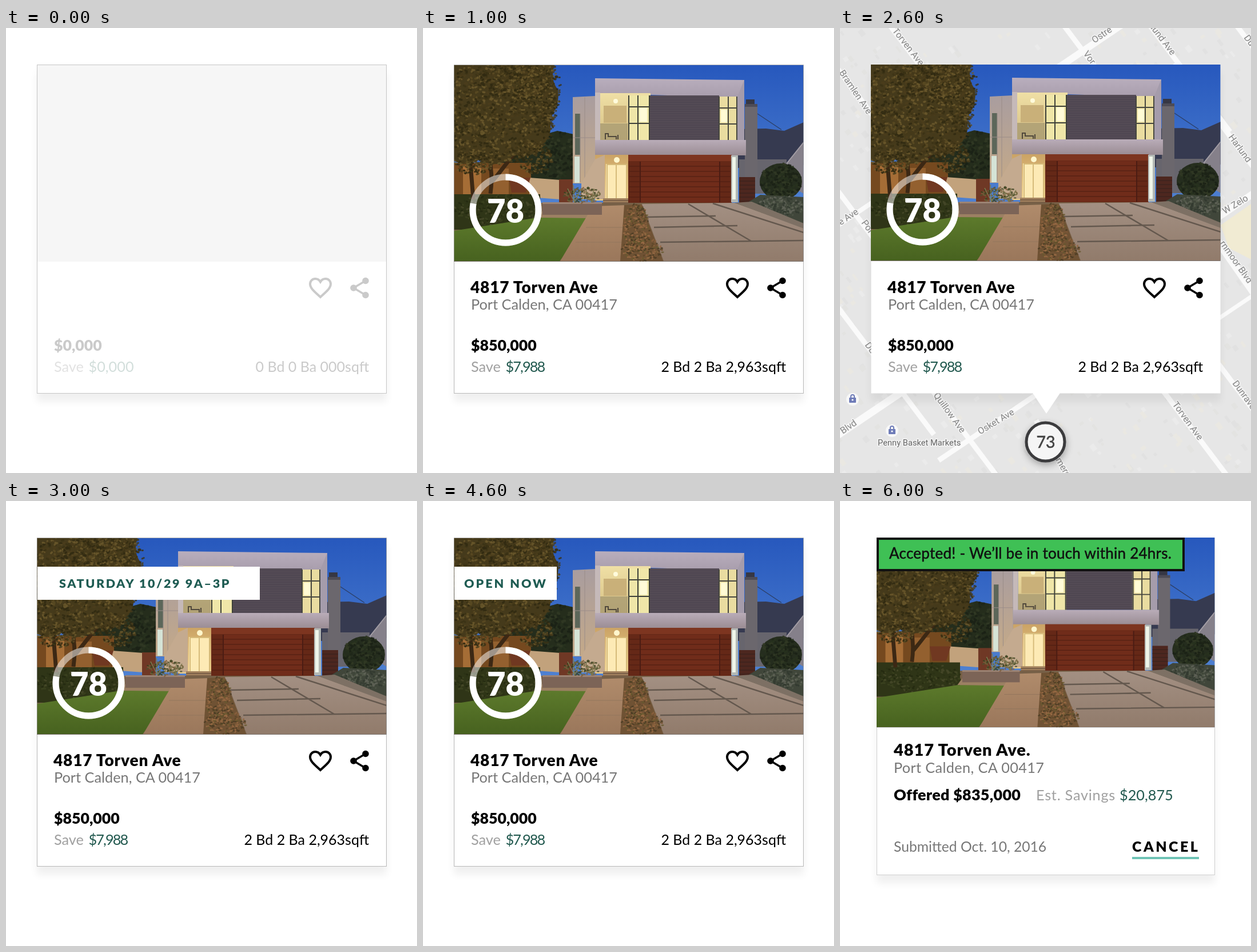
An HTML page for the animation above (7 s loop, 719 by 779 pixels).

```html
<!DOCTYPE html>
<html lang="en">
<head>
<meta charset="utf-8">
<title>Home listing card</title>
<style>
html, body { margin: 0; width: 100%; height: 100%; overflow: hidden; background: #fff; }
svg { display: block; }
text { font-family: Lato, "Open Sans", sans-serif; font-size: 25.3px; }
.b { font-weight: 900; }
.map text { font-family: Roboto, Arial, sans-serif; font-size: 16px; fill: #858585; stroke: #f4f4f4; stroke-width: 3; paint-order: stroke; }
</style>
</head>
<body>
<svg id="stage" width="719" height="779" viewBox="0 0 719 779"></svg>
<script>
let seed = 7;
const rnd = () => (seed = (seed * 16807) % 2147483647) / 2147483647;
const pick = list => list[Math.floor(rnd() * list.length)];

const rect = (x, y, w, h, fill, more = '') => `<rect x="${x}" y="${y}" width="${w}" height="${h}" fill="${fill}" ${more}/>`;
const poly = (pts, fill, more = '') => `<polygon points="${pts}" fill="${fill}" ${more}/>`;
const path = (d, stroke, width, more = '') => `<path d="${d}" fill="none" stroke="${stroke}" stroke-width="${width}" ${more}/>`;
const text = (x, y, str, fill = '#000', more = '') => `<text x="${x}" y="${y}" fill="${fill}" ${more}>${str}</text>`;
const bold = (x, y, str, size, fill = '#000', more = '') => text(x, y, str, fill, `class="b" style="font-size:${size}px" ${more}`);
const grad = (id, a, b) => `<linearGradient id="${id}" x2="0" y2="1"><stop stop-color="${a}"/><stop offset="1" stop-color="${b}"/></linearGradient>`;

// Scattered short dabs inside an ellipse, n per colour
function leaves(n, cx, cy, rx, ry, size, cols) {
  return cols.map(col => {
    let d = '';
    for (let i = 0; i < n; i++) {
      const a = rnd() * Math.PI * 2, r = Math.sqrt(rnd()), s = size * (rnd() - 0.5);
      d += `M${(cx + rx * r * Math.cos(a)).toFixed(1)} ${(cy + ry * r * Math.sin(a)).toFixed(1)}l${(size * rnd()).toFixed(1)} ${s.toFixed(1)}`;
    }
    return path(d, col, size, 'stroke-linecap="round" opacity=".8"');
  }).join('');
}

function slats(x, y, w, h, step, color) {
  let d = '';
  for (let v = y + step; v < y + h; v += step) d += `M${x} ${v}h${w}`;
  return path(d, color, 1);
}

function house() {
  return [
    // upper floor
    poly('262,121 301,119 301,272 262,272', 'url(#wing)'),
    rect(266, 150, 9, 72, '#5c6659'), rect(265, 225, 9, 46, '#d5e3d6'),
    path('M275 150V270M283 121V270M262 192h39', '#9a8c88', 1),
    poly('301,88 562,91 562,122 550,122 309,114 301,114', 'url(#roof)'),
    rect(301, 113, 9, 110, '#c5b9b9'),
    rect(310, 114, 88, 82, 'url(#room)'),
    rect(316, 136, 40, 30, '#c9b079'),
    `<circle cx="337" cy="128" r="4" fill="#fffbdc"/>`,
    rect(310, 167, 48, 29, '#a99b72', 'opacity=".8"'),
    path('M319 195v-10h5v5h14v5M341 195v-8', '#50483c', 2),
    rect(359, 118, 38, 78, '#efe6a8'),
    path('M360 118V196M376 118V196M396 118V196M360 138h36M360 167h36', '#3d4039', 2),
    rect(379, 140, 13, 24, '#fffbd7'),
    rect(397, 118, 121, 78, '#544b55'), slats(397, 118, 121, 78, 4, '#4b434e'),
    rect(517, 120, 34, 76, '#e9dca0'),
    path('M518 120V196M534 120V196M549 120V196M518 140h32M518 168h32', '#45463f', 2),
    rect(521, 143, 11, 22, '#fffbd4'),
    poly('550,120 562,91 562,197 550,197', '#a59cab'),
    rect(301, 196, 264, 27, 'url(#band)'),
    // ground floor
    rect(301, 222, 59, 80, 'url(#porch)'),
    poly('277,272 301,230 318,222 318,300 277,300', '#c4aa8f'),
    rect(320, 238, 37, 60, '#fdeab5'), path('M322 299V239H356V299M338 240V298', '#d6bb7a', 2),
    `<circle cx="339" cy="231" r="5" fill="#fff6cc"/>`,
    rect(315, 298, 44, 12, '#a3835f'), path('M315 302h44M315 306h44', '#705641', 1.5),
    rect(359, 222, 181, 84, '#652817'),
    rect(359, 222, 181, 11, '#7d3520'), rect(380, 234, 139, 71, '#702c1a'),
    slats(361, 233, 177, 72, 9, '#4b1c11'), path('M380 234V305M519 234V305', '#4b1c13', 2),
    rect(539, 223, 12, 82, '#b4b9b5'), rect(541, 226, 6, 74, '#eff5e9')
  ].join('');
}

function photo() {
  const bark = ['#4b3d1c', '#5c4b24', '#3a3115', '#6d5a2e', '#45391a', '#2f2911'];
  const dark = ['#1f2618', '#29321f', '#323a25', '#1a2014'];
  const scrub = ['#7d5836', '#8c623e', '#5d4628', '#67592f', '#9a6c45', '#4a3b23'];
  const gray = ['#545c4b', '#3f463a', '#63665a', '#30372e'];
  return [
    rect(54, 65, 612, 344, 'url(#sky)'),
    // neighbour on the right
    poly('550,177 600,176 632,180 666,165 666,240 550,245', '#363a50'),
    path('M585 150L627 178', '#2c4069', 1.5),
    poly('666,201 635,239 640,275 666,290', '#85808a'), path('M666 200L634 240', '#a59fa6', 2),
    rect(553, 230, 83, 60, '#67656d'),
    rect(563, 134, 22, 132, '#6b676d'), rect(565, 125, 15, 10, '#363744'), rect(563, 133, 22, 5, '#4e4c56'),
    // garden on the left
    poly('200,190 235,180 264,186 264,268 130,268 130,215', '#252d1c'),
    leaves(40, 232, 222, 32, 42, 4, dark),
    rect(54, 236, 135, 80, '#75491f'), rect(70, 240, 32, 60, '#a56d36'), rect(120, 246, 30, 50, '#93602f'),
    house(),
    poly('186,262 240,266 240,300 186,296', '#c2a27c'), rect(238, 265, 24, 42, '#6f3825'),
    poly('150,262 188,262 180,288 155,288', '#703821'),
    rect(54, 306, 612, 103, '#776047'),
    rect(54, 291, 151, 62, '#2f3517'),
    leaves(60, 130, 318, 76, 27, 3, ['#2b3114', '#3d4320', '#242910', '#48492a']),
    poly('200,332 209,320 312,326 298,334', '#9c8063'),
    poly('54,355 200,332 298,333 239,408 54,408', 'url(#lawn)'),
    // paving
    poly('297,312 357,310 346,408 240,408', 'url(#walk)'),
    path('M285 349h66M267 375h82', '#92765d', 1),
    poly('383,308 545,306 666,350 666,408 421,408', 'url(#drive)'),
    path('M392 331L512 329M404 349L550 346M415 375L666 372M464 308L574 373M507 307L666 358', '#64584e', 2.5),
    poly('352,310 382,309 420,408 345,408', '#6f5234'),
    leaves(55, 373, 350, 23, 42, 2.6, scrub), leaves(35, 383, 388, 36, 20, 2.6, scrub),
    rect(209, 307, 104, 20, '#7c6457'), rect(209, 305, 104, 3, '#9c8373'),
    leaves(30, 278, 293, 33, 14, 2.6, ['#4d5230', '#6b643a', '#80603f', '#39401f']),
    path('M265 305l-12-24M265 305l-2-30M265 305l12-25M295 305l-10-20M295 305l4-24M295 305l13-20', '#7c7a50', 1.5),
    // right planting
    rect(553, 261, 28, 45, '#4d271f'), slats(553, 261, 28, 45, 7, '#35211d'),
    `<ellipse cx="626" cy="269" rx="37" ry="32" fill="#252d1e"/>`,
    leaves(60, 625, 268, 35, 32, 3.5, dark),
    poly('570,304 590,292 666,296 666,342 640,336', '#40463a'),
    leaves(50, 625, 312, 40, 18, 3, gray),
    poly('545,306 575,304 666,342 666,351', '#7d7064'),
    // big tree
    path('M118 290Q125 240 105 190M120 270Q145 240 170 205M88 300L82 225', '#3c2814', 7),
    `<path d="M54 65H230Q222 90 236 108Q240 135 222 158Q228 190 208 205Q190 232 160 222Q130 250 98 230Q75 245 54 232Z" fill="#453a1b"/>`,
    leaves(240, 130, 145, 103, 94, 3.4, bark), leaves(80, 165, 88, 66, 36, 3.4, bark),
    leaves(35, 203, 105, 38, 60, 3, bark), leaves(30, 195, 228, 30, 28, 3, bark), leaves(35, 88, 235, 36, 22, 3, bark)
  ].join('');
}

const ring = () => {
  const c = 2 * Math.PI * 57.5;
  return `<g fill="none" stroke="#fff" stroke-width="11" transform="rotate(-90 144.5 318.5)">
    <circle cx="144.5" cy="318.5" r="57.5" opacity=".5"/>
    <circle cx="144.5" cy="318.5" r="57.5" stroke-dasharray="${c * 0.78} ${c}"/></g>` +
    bold(144.5, 340.5, '78', 56, '#fff', 'text-anchor="middle"');
};

const icons = color => `<g transform="translate(526 431) scale(2)">` +
  path('M12 20L10.5 18.6C5.8 14.4 3 11.8 3 8.5C3 6 5 4 7.5 4C9.3 4 11 5 12 6.7C13 5 14.7 4 16.5 4C19 4 21 6 21 8.5C21 11.8 18.2 14.4 13.5 18.6Z', color, 2) +
  `</g><g fill="${color}">` + path('M629 442.5L608 455L629 467.5', color, 3.5) +
  [[629, 442.5], [608, 455], [629, 467.5]].map(([x, y]) => `<circle cx="${x}" cy="${y}" r="5.8"/>`).join('') + '</g>';

const panel = (x, y, w, h, line) => rect(x, y + 14, w, h, '#000', 'opacity=".06" filter="url(#soft)"') +
  rect(x + 0.5, y + 0.5, w - 1, h - 1, '#fff', line ? `stroke="${line}"` : '');

const facts = (price, save, size, p) => bold(84, 565, price, 26.7, p.ink) +
  text(84, 602, 'Save', p.save) + text(144.5, 602, save, p.green, p.tight) +
  text(635, 602, size, p.ink, `text-anchor="end" style="font-size:25px"`) + icons(p.ink);

const blank = () => panel(54, 64, 612, 576, '#c6c6c6') + rect(55, 65, 610, 344, '#f6f6f6') +
  facts('$0,000', '$0,000', '0 Bd 0 Ba 000sqft', { ink: '#cacaca', save: '#e2e2e2', green: '#d2dedb', tight: '' });

const listing = (line, dy = 0) => panel(54, 64, 612, 576, line) +
  `<g transform="translate(0 ${dy})"><use href="#photo"/>${ring()}</g>` +
  (line ? path('M54.5 65V408M665.5 65V408', '#8f8f8f', 0.6) : '') +
  bold(83, 463.5, '4817 Torven Ave', 28, '#000', 'letter-spacing=".85"') + text(84, 493, 'Port Calden, CA 00417', '#777') +
  facts('$850,000', '$7,988', '2 Bd 2 Ba 2,963sqft', { ink: '#000', save: '#a0a0a0', green: '#22594f', tight: 'letter-spacing="-1.9"' });

const tag = (w, x, str, gap) => rect(55, 115, w, 58, '#fff') +
  bold(x, 151.5, str, 21.5, '#1f5c53', `letter-spacing="${gap}"`);

const offer = (w, fill, str) => panel(64, 64, 592, 591, '#cfcfcf') +
  `<use href="#photo" transform="translate(64 64) scale(.967) translate(-54 -65)"/>` +
  rect(66, 66, w - 4, 55, fill, 'stroke="#111" stroke-width="4"') +
  text(86, 101, str, '#111', 'style="font-size:26px" letter-spacing=".25" stroke="#111" stroke-width=".5"') +
  bold(94, 446, '4817 Torven Ave.', 29, '#000', 'letter-spacing=".9"') + text(94, 476, 'Port Calden, CA 00417', '#777', 'letter-spacing=".35"') +
  bold(94, 524, 'Offered $835,000', 26.9, '#000', 'letter-spacing=".3"') +
  text(343, 524, 'Est. Savings', '#a0a0a0', 'letter-spacing=".75"') + text(489, 524, '$20,875', '#22594f') +
  text(94, 614, 'Submitted Oct. 10, 2016', '#777', 'style="font-size:24.7px"') +
  bold(511, 614, 'CANCEL', 25, '#000', 'letter-spacing="3.5"') + rect(511, 623, 117, 4, '#6ec3b5');

const bag = (x, y) => `<circle cx="${x}" cy="${y}" r="11" fill="#f8f8f8"/>` +
  rect(x - 6, y - 3, 12, 9, '#6f7cb8', 'rx="1"') + path(`M${x - 3} ${y - 3}v-2a3 3 0 0 1 6 0v2`, '#6f7cb8', 2) +
  `<circle cx="${x}" cy="${y + 1}" r="1.6" fill="#fff"/>`;

function map() {
  const street = (x, y, deg, len, w) => rect(x - len, y - w / 2, len * 2, w, '#fafafa', `transform="rotate(${deg} ${x} ${y})"`);
  const label = (x, y, deg, str) => text(x, y, str, '#858585', `transform="rotate(${deg} ${x} ${y})"`);
  let lots = '';
  for (let i = 0; i < 700; i++) {
    const x = Math.round(rnd() * 719), y = Math.round(rnd() * 779);
    lots += rect(x, y, 5 + rnd() * 9 | 0, 4 + rnd() * 6 | 0, pick(['#e1e1e1', '#ebebeb', '#e3e3e1', '#eae8e2']), `transform="rotate(53 ${x} ${y})"`);
  }
  const down = [[117, 35], [440, 60], [568, 30], [25, 110], [45, 350], [50, 560], [190, 672], [700, 213], [705, 645], [712, 20]];
  const up = [[455, 20, 130, 12], [20, 330, 70, 8], [15, 700, 150, 13], [272, 690, 120, 9], [693, 310, 80, 12], [690, 490, 60, 7]];
  return '<g class="map">' + rect(0, 0, 719, 779, '#e6e6e6') + lots +
    poly('666,345 719,308 719,405 680,385', '#f1ebd3') +
    down.map(([x, y]) => street(x, y, 53, 190, 9)).join('') + street(692, 418, 55, 190, 13) + street(605, 688, 53, 170, 9) + street(388, 765, 60, 90, 9) +
    up.map(([x, y, len, w]) => street(x, y, -34, len, w)).join('') +
    label(91, 5, 52, 'Torven Ave') + label(445, 27, -34, 'Ostre') + label(425, 45, 54, 'Vor') +
    label(543, 0, 53, 'lund Ave') + label(706, 17, 54, 'Du') + label(-2, 78, 56, 'Bramlen Ave') +
    label(679, 191, 54, 'Harlund') + label(673, 326, -31, 'W Zelo') + label(664, 377, 55, 'rnmoor Blvd') +
    label(-2, 348, -34, 'ie Ave') + label(37, 341, 54, 'Pol') + label(43, 555, 54, 'Du') +
    label(5, 711, -34, 'Blvd') + label(163, 643, 54, 'Quillow Ave') + label(245, 712, -31, 'Osket Ave') +
    label(581, 659, 54, 'Torven Ave') + label(686, 622, 54, 'Dunrave') + label(377, 756, 60, 'mere') +
    bag(22, 650) + bag(91, 705) + text(66, 731, 'Penny Basket Markets', '#666', 'style="fill:#666;font-size:14.7px"') + '</g>';
}

const pin = () => poly('337,639 385,639 361,675', '#fff') +
  `<circle cx="360" cy="729" r="35" opacity=".35" filter="url(#soft)"/>
  <circle cx="359.5" cy="724.5" r="33.5" fill="#f5f5f5" stroke="#3b3b3d" stroke-width="5"/>` +
  text(360, 735, '73', '#444', 'text-anchor="middle" style="font-size:28.5px" stroke="#444" stroke-width=".6"');

const edge = '#b9b9b9';
const scenes = [
  blank(),
  listing(edge),
  map() + listing('', -1) + pin(),
  listing(edge) + tag(389, 93, 'SATURDAY 10/29 9A–3P', 2.6),
  listing(edge) + tag(179, 72, 'OPEN NOW', 3),
  offer(469, '#dbab2d', 'Pending - You’ll be notified in 24hrs.'),
  offer(539, '#3fc055', 'Accepted! - We’ll be in touch within 24hrs.')
];

const stage = document.getElementById('stage');
stage.innerHTML = '<defs>' +
  grad('sky', '#2758bd', '#5f92da') + grad('roof', '#b9aebd', '#a89dac') + grad('band', '#b9acb8', '#9a8c93') +
  grad('wing', '#a99d9f', '#c4a988') + grad('room', '#efdfa5', '#d6c084') + grad('porch', '#cba365', '#efd18b') +
  grad('lawn', '#5d7a2c', '#47621f') + grad('walk', '#b08b6b', '#9a775b') + grad('drive', '#a39083', '#917b6b') +
  `<filter id="soft" x="-20%" y="-20%" width="140%" height="140%"><feGaussianBlur stdDeviation="7"/></filter>
  <clipPath id="crop"><rect x="54" y="65" width="611.5" height="343.7"/></clipPath>
  <g id="photo" clip-path="url(#crop)">${photo()}</g></defs>` +
  scenes.map(s => `<g class="scene" display="none">${s}</g>`).join('');

const groups = stage.querySelectorAll('.scene');
let shown = -1;
function draw(ms) {
  const now = Math.floor((ms % 7000) / 1000);
  if (now === shown) return;
  groups.forEach((g, i) => g.setAttribute('display', i === now ? 'inline' : 'none'));
  shown = now;
}

const start = performance.now();
function tick() {
  draw(performance.now() - start);
  requestAnimationFrame(tick);
}
tick();
</script>
</body>
</html>
```
